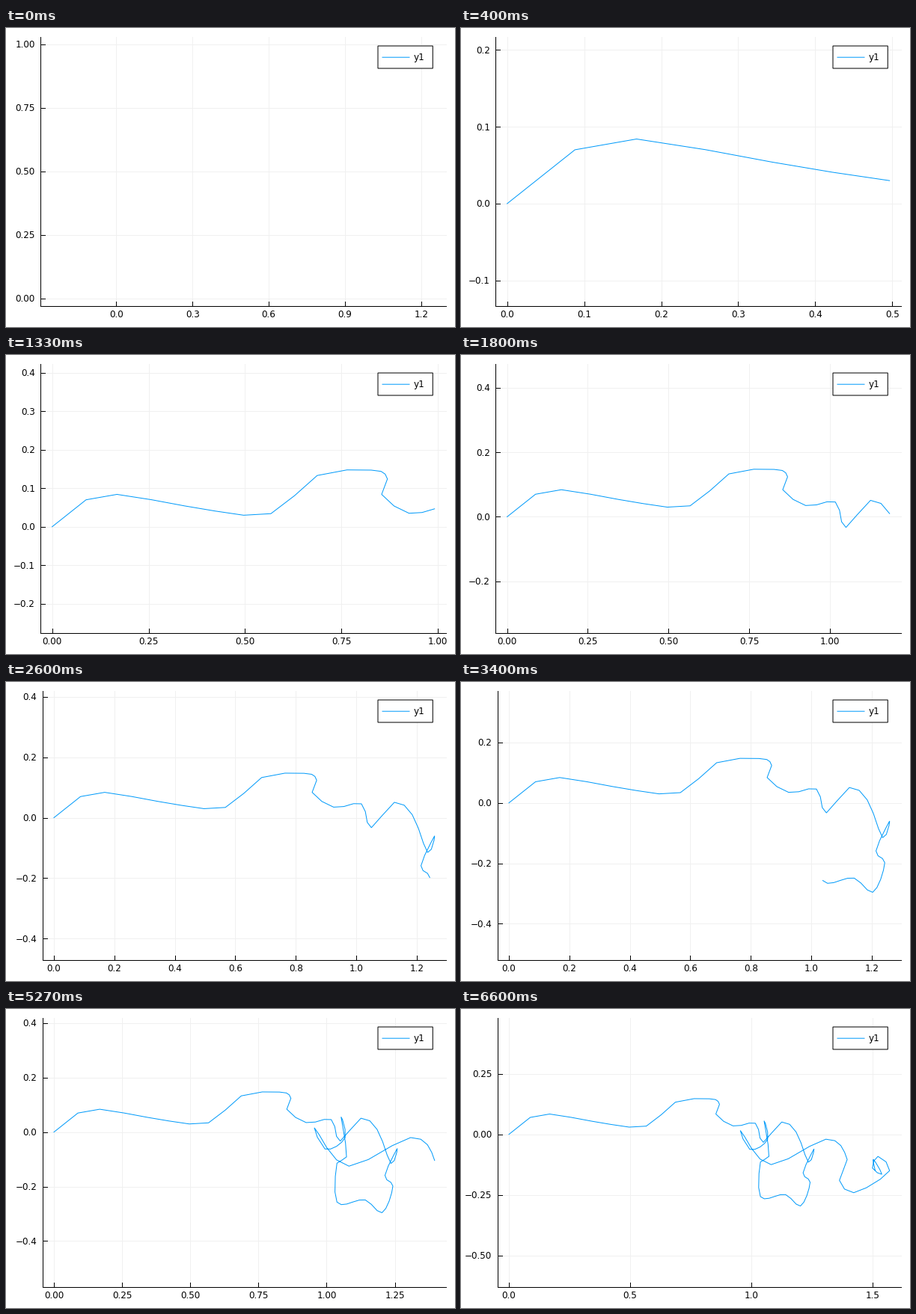
These frames come from a looping animation (600 px wide and 400 px high, 6.67 s). A matplotlib script:

```python
import math

import matplotlib.pyplot as plt
import numpy as np
from matplotlib.animation import FuncAnimation
from matplotlib.patches import Rectangle

W, H, DPI = 600, 400, 100
FRAMES, INTERVAL = 100, 66.67
RIGHT, TOP, BOTTOM = 588, 11.8, 371.7
PX = 72 / DPI
FONT = dict(family="DejaVu Sans", fontsize=12 * PX, color="black")
BLUE, GRID = "#009afa", "#f0f0f0"

# Turning points of the walk: step, x and y in thousandths
TURNS = [(0, 0, 0), (1, 88, 70), (2, 168, 84), (4, 344, 54), (7, 567, 34),
         (9, 687, 133), (11, 827, 147), (14, 869, 124), (15, 854, 84),
         (17, 925, 35), (20, 1017, 46), (23, 1050, -33), (25, 1126, 51),
         (27, 1185, 10), (30, 1236, -115), (33, 1259, -60),
         (36, 1214, -159), (39, 1243, -198), (43, 1203, -296),
         (46, 1142, -249), (51, 1038, -257), (54, 1038, -114),
         (56, 1073, -91), (59, 1053, 56), (62, 1068, -20), (66, 994, -62),
         (68, 955, 16), (72, 1082, -125), (75, 1308, -20),
         (79, 1396, -104), (81, 1364, -190), (83, 1423, -241),
         (86, 1571, -150), (88, 1523, -91), (90, 1500, -139),
         (92, 1539, -165), (95, 1504, -103), (99, 1511, -148)]

NICE = ((1, 1.0), (5, 0.9), (2, 0.7), (2.5, 0.5), (3, 0.2))


def spline(t, knots, values):
    """Cubic curve through the knots, heading along neighbouring chords."""
    slopes = np.empty_like(values)
    slopes[1:-1] = ((values[2:] - values[:-2])
                    / (knots[2:] - knots[:-2])[:, None])
    slopes[0] = (values[1] - values[0]) / (knots[1] - knots[0])
    slopes[-1] = (values[-1] - values[-2]) / (knots[-1] - knots[-2])

    k = np.clip(np.searchsorted(knots, t, "right") - 1, 0, len(knots) - 2)
    h = (knots[k + 1] - knots[k])[:, None]
    u = (t - knots[k])[:, None] / h
    ease = u * u * (3 - 2 * u)
    return (values[k] * (1 - ease) + values[k + 1] * ease
            + h * u * (1 - u) * (slopes[k] * (1 - u) - slopes[k + 1] * u))


turns = np.array(TURNS, float)
walk = spline(np.arange(FRAMES), turns[:, 0], turns[:, 1:] / 1000)


def find_ticks(lo, hi):
    """Best 4 to 8 round ticks inside the limits, and their labels."""
    span = hi - lo
    order = math.floor(math.log10(span))
    options = []
    for z in range(order - 2, order + 1):
        for q, nice in NICE:
            step = q * 10.0 ** z
            first = math.ceil(lo / step - 1e-9)
            last = math.floor(hi / step + 1e-9)
            n = last - first + 1
            if 4 <= n <= 8:
                score = (0.25 * (1 - abs(n - 5) / 5)
                         + (first <= 0 <= last) / 6
                         + 0.5 * span / ((n - 1) * step) + 0.25 * nice)
                digits = max(0, -z) + (q == 2.5)
                options.append((round(score, 6), -n, step, first, digits))
    _, n, step, first, digits = max(options)
    ticks = step * np.arange(first, first - n)
    labels = [f"{t + 0.0:.{digits}f}".replace("-", "\u2212") for t in ticks]
    return ticks, labels


def text_width(label):
    em = {"\u2212": 0.838, ".": 0.318}
    return 12 * sum(em.get(c, 0.636) for c in label)


def padded(v):
    pad = 0.03 * (v.max() - v.min())
    return v.min() - pad, v.max() + pad


def layout(pts):
    """Plot's left edge, scale and centre for equal axis units."""
    (x0, x1), (y0, y1) = padded(pts[:, 0]), padded(pts[:, 1])
    _, labels = find_ticks(y0, y1)
    left = 19.6 + max(map(text_width, labels))
    scale = min((RIGHT - left) / (x1 - x0), (BOTTOM - TOP) / (y1 - y0))
    return left, scale, (x0 + x1) / 2, (y0 + y1) / 2


fig = plt.figure(figsize=(W / DPI, H / DPI), dpi=DPI, facecolor="white")
ax = fig.add_axes([0, 0, 1, 1])


def line(xs, ys, color="black", z=2, **kw):
    ax.plot(xs, ys, color=color, lw=PX, zorder=z, **kw)


def draw_legend():
    ax.add_patch(Rectangle((497, 24), 73.3, 30, fc="white", ec="black",
                           lw=PX, zorder=5, snap=False))
    line([503, 539], [39.2, 39.2], BLUE, 6, snap=False)
    ax.text(545, 43.4, "y1", zorder=6, **FONT)


def draw(i):
    ax.cla()
    ax.axis("off")
    ax.set_xlim(0, W)
    ax.set_ylim(H, 0)

    pts = walk[:i + 1]
    left, scale, cx, cy = layout(pts if i else np.array([(0, 0), (1, 1)]))
    mid_x, mid_y = (left + RIGHT) / 2, (TOP + BOTTOM) / 2
    half_x, half_y = (RIGHT - left) / 2 / scale, (BOTTOM - TOP) / 2 / scale

    def to_x(v):
        return mid_x + (v - cx) * scale

    def to_y(v):
        return mid_y - (v - cy) * scale

    for t, label in zip(*find_ticks(cx - half_x, cx + half_x)):
        x = to_x(t)
        line([x, x], [TOP, BOTTOM], GRID, 1)
        line([x, x], [BOTTOM, BOTTOM - 5.4])
        ax.text(x, 387, label, ha="center", **FONT)
    for t, label in zip(*find_ticks(cy - half_y, cy + half_y)):
        y = to_y(t)
        line([left, RIGHT], [y, y], GRID, 1)
        line([left, left + 6], [y, y])
        ax.text(left - 7.6, y + 4.5, label, ha="right", **FONT)

    line([left, RIGHT], [BOTTOM, BOTTOM])
    line([left, left], [TOP, BOTTOM])
    if i:
        line(to_x(pts[:, 0]), to_y(pts[:, 1]), BLUE, 3,
             solid_joinstyle="miter")
    draw_legend()
    return []


anim = FuncAnimation(fig, draw, frames=FRAMES, interval=INTERVAL,
                     init_func=lambda: [], repeat=True, repeat_delay=0)
plt.show()
```
